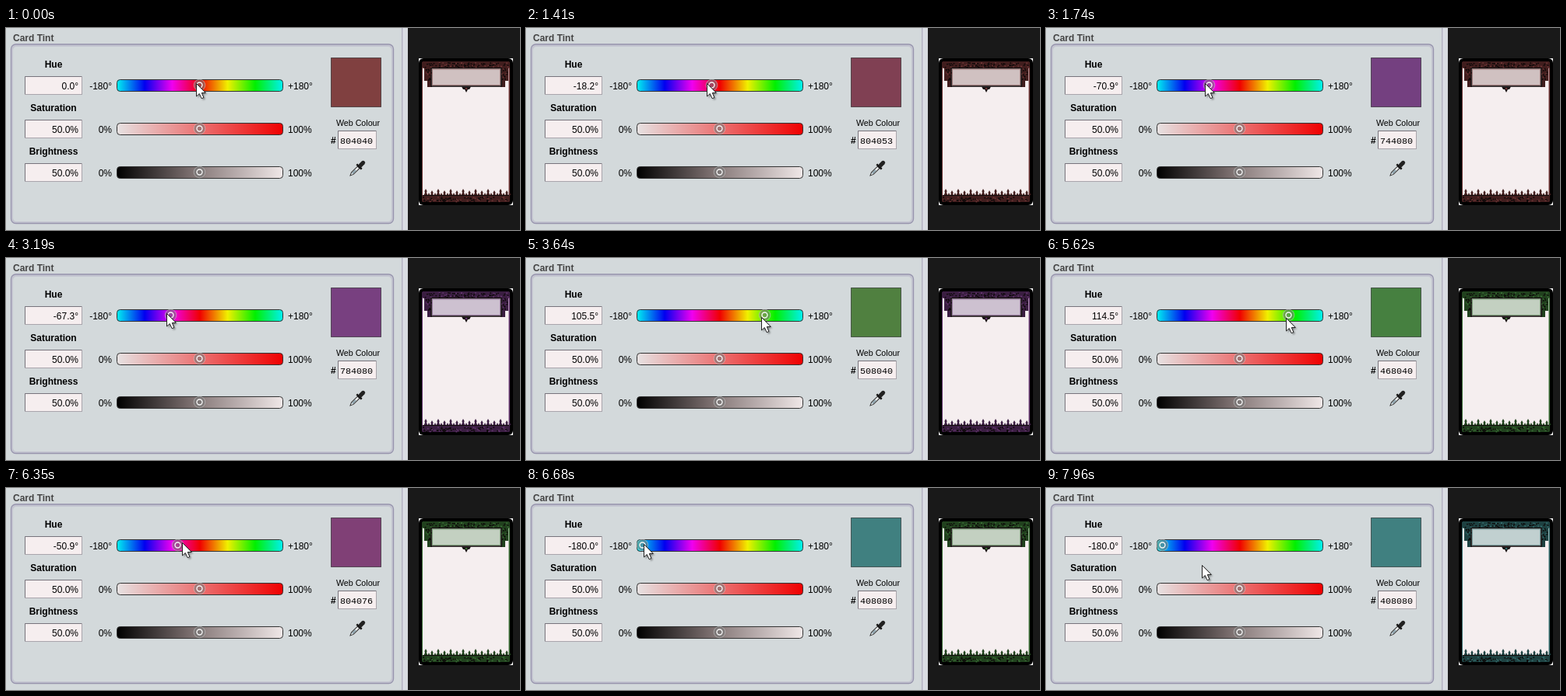
An HTML page that plays this animation: 660x260 px, repeating every 7.99 s.

```html
<!DOCTYPE html>
<html lang="en">
<head>
<meta charset="utf-8">
<title>Card Tint</title>
<style>
  html, body { margin: 0; width: 100%; height: 100%; overflow: hidden; background: #d3d9db; }
  svg { display: block; width: 660px; height: 260px; font: 12px "Liberation Sans", Arial, sans-serif; }
  .bold { font-weight: bold; }
  .mid { text-anchor: middle; }
  .end { text-anchor: end; }
  .mono { font: 11.7px "Liberation Mono", monospace; }
  .tint { fill: var(--tint); }
  .deep { fill: var(--deep); }
  .panel { fill: var(--panel); }
</style>
</head>
<body>
<svg viewBox="0 0 660 260">
  <defs>
    <linearGradient id="hueBar">
      <stop offset="0" stop-color="#00f0f0"/><stop offset=".167" stop-color="#0000f0"/>
      <stop offset=".333" stop-color="#f000f0"/><stop offset=".5" stop-color="#f00000"/>
      <stop offset=".667" stop-color="#f0f000"/><stop offset=".833" stop-color="#00f000"/>
      <stop offset="1" stop-color="#00f0f0"/>
    </linearGradient>
    <linearGradient id="satBar"><stop stop-color="#e6e2e2"/><stop offset="1" stop-color="#f00000"/></linearGradient>
    <linearGradient id="briBar">
      <stop stop-color="#000"/><stop offset=".5" stop-color="#8a7c7c"/><stop offset="1" stop-color="#f0e8e8"/>
    </linearGradient>
    <linearGradient id="edge"><stop stop-color="#a9a6b8"/><stop offset=".3" stop-color="#dcdfe6"/><stop offset="1" stop-color="#d6dadd"/></linearGradient>
    <filter id="blur"><feGaussianBlur stdDeviation="1"/></filter>
    <g id="knob">
      <circle r="7.3" fill="#777" fill-opacity=".6" stroke="#ddd" stroke-opacity=".45"/>
      <circle r="3.5" fill="none" stroke="#f4f4f4" stroke-width="1.4"/>
    </g>
    <path id="arrow" d="M0 0V16.5L3.8 13L6.6 19.2L9.4 18L6.8 12H11.8Z"/>
  </defs>

  <rect width="660" height="260" fill="#d3d9db"/>
  <rect x="508" width="8" height="260" fill="url(#edge)"/>
  <rect x="516" width="144" height="260" fill="#191919"/>
  <text x="9" y="17" class="bold" fill="#444">Card Tint</text>
  <rect x="7.5" y="22.5" width="489" height="228" rx="6" fill="none" stroke="#c3c4d0" stroke-width="3"/>
  <rect x="6.5" y="21" width="491" height="230.5" rx="6" fill="none" stroke="#9794ad" stroke-width="1.3"/>

  <g id="rows"></g>

  <rect id="swatch" x="417.5" y="38.5" width="64" height="63" stroke="#000" stroke-opacity=".5"/>
  <text x="452" y="126" class="mid" font-size="10.7">Web Colour</text>
  <text x="417" y="149" class="bold">#</text>
  <g id="webField"></g>

  <g transform="translate(442 190) rotate(45)">
    <path d="M0 0L-1.8-4V-15H1.8V-4Z" fill="#f2f5f6" stroke="#333"/>
    <path d="M-1-4H1V-10H-1Z" fill="#8ba2ac"/>
    <path d="M-4.5-17.5H4.5V-15H-4.5Z" fill="#111"/>
    <rect x="-2.6" y="-26" width="5.2" height="10" rx="2.6" fill="#222"/>
  </g>

  <g id="card">
    <rect x="530" y="39" width="121" height="189" fill="#eee"/>
    <rect x="530" y="39" width="121" height="189" rx="6" fill="#000"/>
    <rect x="534" y="43" width="113" height="181" rx="3" class="tint"/>
    <rect x="535" y="50" width="110.5" height="166" fill="#f5eeef"/>
    <rect x="534" y="43" width="113" height="9" rx="3" class="deep"/>
    <path d="M537 50H547V76H541V68H537ZM635 50H645V68H641V76H635Z" class="deep"/>
    <rect x="546" y="51.5" width="90" height="23.5" class="panel" stroke="#181212" stroke-width="1.6"/>
    <rect x="547.5" y="53" width="87" height="20.5" fill="none" style="stroke:var(--tint)" stroke-opacity=".5"/>
    <path d="M585 75.5H597L595 79H593L591 83L589 79H587Z" fill="#181212"/>
    <circle cx="591" cy="78" r="1.3" class="tint"/>
    <rect x="534" y="215" width="113" height="9" rx="2" class="deep"/>
    <path d="M535 215.5H646" stroke="#120c0c"/>
    <g id="ornament"></g>
  </g>

  <g id="cursor">
    <use href="#arrow" x="2" y="2" fill="#000" opacity=".4" filter="url(#blur)"/>
    <use href="#arrow" fill="#fff" stroke="#222" stroke-width="1"/>
  </g>
</svg>
<script>
const $ = id => document.getElementById(id);
const LOOP = 7990, CENTRE = 248.5, RANGE = 99;

const field = (x, y, width, id, text, cls, textX) => `
  <rect x="${x}.5" y="${y}.5" width="${width}" height="23" fill="#f6eeef" stroke="#a9a5ac"/>
  <path d="M${x}.5 ${y + 23}V${y}.5H${x + width}" fill="none" stroke="#77747c"/>
  <text id="${id}" x="${textX}" y="${y + 17}" class="${cls}">${text}</text>`;

const row = (y, name, value, low, high, key) => `
  <text x="61" y="${y - 15}" class="bold mid">${name}</text>
  ${field(24, y - 4, 73, key + "Value", value, "end", 93)}
  <text x="136" y="${y + 13}" class="end">${low}</text>
  <rect x="142.5" y="${y}.5" width="213" height="15" rx="4" fill="url(#${key}Bar)" stroke="#333"/>
  <text x="362" y="${y + 13}">${high}</text>
  <use id="${key}Knob" href="#knob" transform="translate(${CENTRE} ${y + 7.5})"/>`;

$("rows").innerHTML =
  row(66, "Hue", "0.0°", "-180°", "+180°", "hue") +
  row(122, "Saturation", "50.0%", "0%", "100%", "sat") +
  row(178, "Brightness", "50.0%", "0%", "100%", "bri");
$("webField").innerHTML = field(426, 132, 49, "webValue", "804040", "mono", 429);

// Spiked fence and seeded flecks along the card's frame
const noise = n => Math.abs(Math.sin(n * 127.1) * 43758.5) % 1;
let ornament = "";
for (let i = 0; i < 14; i++) {
  const x = 539 + i * 8, top = i % 2 ? 209 : 207;
  ornament += `<path d="M${x} ${top}L${x + 1.6} ${top + 3}L${x + 1} ${top + 5}L${x + 2.4} 215H${x - 2.4}L${x - 1} ${top + 5}L${x - 1.6} ${top + 3}Z" class="deep"/>
    <path d="M${x + 2.5} 215L${x + 4} 212L${x + 5.5} 215Z" class="deep"/>`;
}
for (let i = 0; i < 190; i++) {
  const x = 535 + noise(i) * 109, y = (i % 2 ? 44 : 217) + noise(i + 300) * 6;
  ornament += `<rect x="${x.toFixed(1)}" y="${y.toFixed(1)}" width="1.8" height="1.4" ${i % 3 ? 'fill="#0c0808"' : 'class="tint"'}/>`;
}
for (let i = 0; i < 36; i++) {
  const x = (i % 2 ? 538 : 636) + noise(i + 70) * 7, y = 51 + noise(i + 500) * 16;
  ornament += `<rect x="${x.toFixed(1)}" y="${y.toFixed(1)}" width="1.8" height="1.6" ${i % 3 ? 'fill="#0c0808"' : 'class="tint"'}/>`;
}
$("ornament").innerHTML = ornament;

const linear = u => u, smooth = u => u * u * (3 - 2 * u), out = u => 1 - (1 - u) ** 2;

// Keys: [time, easing into this key, ...values]
const knobKeys = [
  [0, linear, 0], [1000, linear, 0], [1410, linear, -10], [1740, linear, -39],
  [3160, linear, -39], [3190, linear, -37], [3640, smooth, 58], [3800, out, 63],
  [6180, linear, 63], [6350, linear, -28], [6680, out, -99]
];
const cursorKeys = [
  [0, linear, 244.5, 71], [1000, linear, 244.5, 71], [1410, linear, 232.5, 71], [1740, linear, 204.5, 71],
  [3160, linear, 204.5, 71], [3190, linear, 206.5, 71], [3640, smooth, 302, 77], [3800, out, 307.5, 76],
  [5590, linear, 307.5, 76], [5620, linear, 308.5, 77], [5770, out, 316, 77],
  [6180, linear, 316, 77], [6350, linear, 227, 70], [6680, out, 151.5, 72],
  [7870, linear, 151.5, 72], [7960, linear, 200.5, 99]
];
const cardKeys = [[0, 0], [1960, -39], [4130, 63], [7070, -99]];

function sample(keys, t) {
  const next = keys.findIndex(key => key[0] > t);
  if (next < 0) return keys.at(-1).slice(2);
  const [start, , ...from] = keys[next - 1], [end, ease, ...to] = keys[next];
  const u = ease((t - start) / (end - start));
  return from.map((v, i) => v + (to[i] - v) * u);
}

const degrees = offset => offset * 180 / RANGE;

function hsv(hue, sat, value) {
  return [5, 3, 1].map(n => {
    const k = (n + hue / 60 + 12) % 6;
    return Math.round(value * (1 - sat * Math.max(0, Math.min(k, 4 - k, 1))));
  });
}
const css = (...args) => `rgb(${hsv(...args)})`;

function draw() {
  const t = performance.now() % LOOP;
  const offset = Math.round(sample(knobKeys, t)[0]);
  const hue = degrees(offset);
  const hex = hsv(hue, .5, 128).map(c => c.toString(16).padStart(2, "0")).join("").toUpperCase();

  $("hueKnob").setAttribute("transform", `translate(${CENTRE + offset} 73.5)`);
  $("hueValue").textContent = hue.toFixed(1) + "°";
  $("webValue").textContent = hex;
  $("swatch").setAttribute("fill", "#" + hex);
  $("cursor").setAttribute("transform", `translate(${sample(cursorKeys, t).map(Math.floor).map(v => v + .5)})`);

  const cardHue = degrees(cardKeys.findLast(key => key[0] <= t)[1]);
  const style = $("card").style;
  style.setProperty("--tint", css(cardHue, .52, 112));
  style.setProperty("--deep", css(cardHue, .55, 66));
  style.setProperty("--panel", css(cardHue, .07, 208));
  requestAnimationFrame(draw);
}
draw();
</script>
</body>
</html>
```
